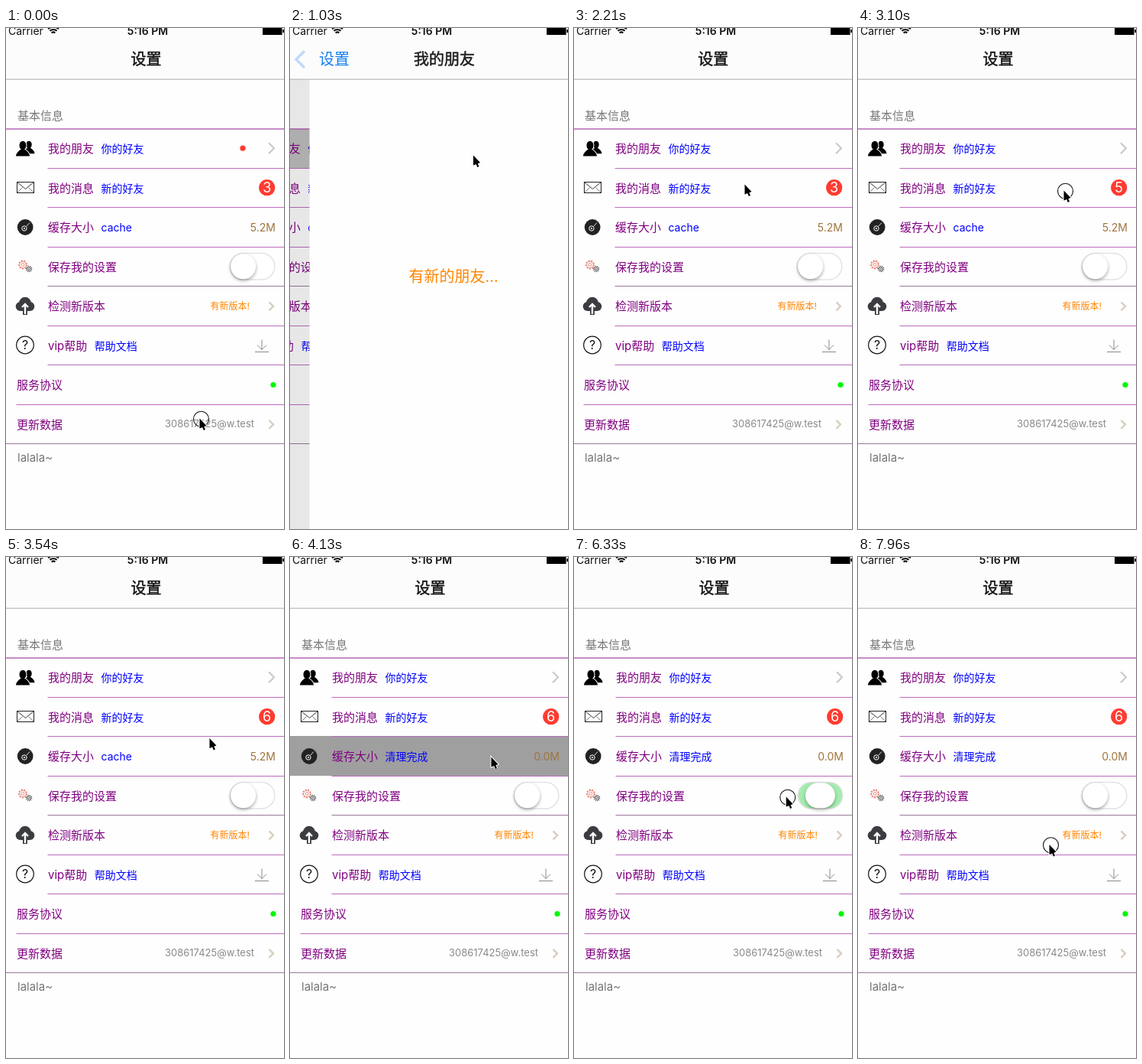
Write an HTML page with a canvas that moves like this. It is 364 by 655 pixels and loops after 8 s.

```html
<!DOCTYPE html>
<html lang="zh">
<head>
<meta charset="utf-8">
<style>
html, body { margin: 0; width: 100%; height: 100%; overflow: hidden; background: #fefefe; }
canvas { display: block; width: 364px; height: 655px; }
</style>
</head>
<body>
<canvas id="stage"></canvas>
<script>
const W = 364, H = 655, LOOP = 8000, STEP = 147.4;
const canvas = document.getElementById('stage');
const g = canvas.getContext('2d');
const scale = window.devicePixelRatio || 1;
canvas.width = W * scale;
canvas.height = H * scale;

const PURPLE = '#800080', BLUE = '#0000ff', RED = '#ff3b30', ORANGE = '#ff8500';
const GRAY = '#8a8a8a', INK = '#111', PAPER = '#fefefe', NAV_BLUE = '#127ff0';

const ROWS = [
  ['我的朋友', '你的好友'], ['我的消息', '新的好友'], ['缓存大小', 'cache'], ['保存我的设置'],
  ['检测新版本'], ['vip帮助', '帮助文档'], ['服务协议'], ['更新数据']
];
const ROW = 51.5;
const rowMid = i => 157.5 + ROW * i;
const rowEnd = i => Math.floor(183.25 + ROW * i);

const clamp = v => Math.max(0, Math.min(1, v));
const lerp = (a, b, p) => a + (b - a) * p;
const smooth = v => { v = clamp(v); return v * v * (3 - 2 * v); };

// Times of taps, counted in steps
const TAP = { friends: 5, back: 11, messages: [16, 18, 21], cache: 26, version: 54 };
const DRAG = { from: 37, to: 44 }, HOLD = { from: 47, to: 49 };
const CLICKS = [0, TAP.friends, TAP.back, ...TAP.messages, TAP.cache, TAP.version];

// Pointer stops: first step, last step, x, y
const MOVES = [
  [0, 3, 240, 167], [8, 11, 45, 41], [13, 15, 223.5, 205], [15, 16, 269.5, 213],
  [23, 25, 263.5, 262], [31, 34, 307.5, 313], [37, 40, 350, 315],
  [41, 45, 205.5, 313], [49, 54, 250.5, 376.5]
];

function pointerAt(n) {
  let at = [253.5, 511];
  for (const [from, to, x, y] of MOVES) {
    const p = smooth((n - from) / (to - from));
    at = [lerp(at[0], x, p), lerp(at[1], y, p)];
  }
  return at;
}

// Critically damped spring from 0 to 1
function spring(ms) {
  const x = Math.max(0, ms) * 0.0174;
  return 1 - (1 + x) * Math.exp(-x);
}

function text(s, x, y, size, color, align = 'left', weight = 400) {
  g.font = `${weight} ${size}px Inter, "Noto Sans CJK SC", "Noto Sans CJK", sans-serif`;
  g.textAlign = align;
  g.fillStyle = color;
  g.fillText(s, x, y);
}

function heading(s, x, color) {
  text(s, x, 48.2, 20, color, 'center');
  g.strokeStyle = color;
  g.lineWidth = 0.5;
  g.strokeText(s, x, 48.2);
}

function dot(x, y, r, color) {
  g.fillStyle = color;
  g.beginPath();
  g.arc(x, y, r, 0, 7);
  g.fill();
}

function ring(x, y, r, color, width = 1) {
  g.strokeStyle = color;
  g.lineWidth = width;
  g.beginPath();
  g.arc(x, y, r, 0, 7);
  g.stroke();
}

function line(points, color, width = 1) {
  g.beginPath();
  points.forEach(p => g.lineTo(...p));
  g.strokeStyle = color;
  g.lineWidth = width;
  g.stroke();
}

function chevron(x, y, size, color, width) {
  line([[x - size, y - Math.abs(size)], [x, y], [x - size, y + Math.abs(size)]], color, width);
}

// Vertical arrow; negative length points up
function arrow(x, y, length, head, color, width) {
  const tip = y + length, back = tip - Math.sign(length) * head;
  line([[x, y], [x, tip]], color, width);
  line([[x - head, back], [x, tip], [x + head, back]], color, width);
}

function pill(x, y, w, h) {
  g.beginPath();
  g.roundRect(x, y, w, h, h / 2);
}

function person(x, y, size) {
  g.beginPath();
  g.ellipse(x, y, size * 0.5, size * 0.65, 0, 0, 7);
  g.moveTo(x - size, y + size * 1.55);
  g.quadraticCurveTo(x - size, y + size, x, y + size * 0.4);
  g.quadraticCurveTo(x + size, y + size, x + size, y + size * 1.55);
  g.closePath();
  g.strokeStyle = PAPER;
  g.lineWidth = 2;
  g.stroke();
  g.fillStyle = '#000';
  g.fill();
}

function gear(x, y, r, color) {
  ring(x, y, r, color, 0.7);
  ring(x, y, r * 0.45, color, 0.7);
  g.setLineDash([r * 0.36, r * 0.5]);
  ring(x, y, r + 1, color, 1.4);
  g.setLineDash([]);
}

function icons() {
  person(30, 152.5, 7.5);
  person(22, 153.5, 9);

  g.strokeStyle = '#222';
  g.lineWidth = 1;
  g.strokeRect(14.5, 201.5, 22, 14);
  line([[14.5, 201.5], [25.5, 210.5], [36.5, 201.5]], '#222', 0.9);
  for (const side of [-1, 1]) {
    line([[25.5 + side * 11, 215.5], [25.5 + side * 4, 208.5]], '#222', 0.6);
  }

  dot(25.2, 260.5, 10.4, '#222');
  ring(24, 262, 3.2, '#fff');
  dot(24, 262, 1, '#fff');
  line([[27, 259], [31, 254.5]], '#ddd');

  gear(22, 309.5, 4.3, '#e0604e');
  gear(30, 315, 2.6, '#444');

  for (const i of [-1, 1, 0]) dot(25 + 6.3 * i, i ? 364 : 359.5, i ? 6 : 7.8, '#3b3c40');
  g.fillRect(19, 362, 12, 8);
  g.fillRect(22, 368, 6, 7);
  arrow(25, 374, -13, 4, '#fff', 2.4);

  ring(25, 414.5, 11.3, INK, 1.2);
  text('?', 25, 420.3, 16, INK, 'center');
}

function toggle(n) {
  const on = smooth((n - 39) / 2) - smooth((n - 42) / 2);
  const extra = n >= DRAG.from && n <= DRAG.to ? 6 : 0;
  pill(293.2, 294.5, 58.6, 34.5);
  g.fillStyle = '#fff';
  g.fill();
  g.globalAlpha = on;
  g.fillStyle = '#4cd964';
  g.fill();
  g.globalAlpha = 1;
  g.strokeStyle = on > 0.5 ? '#4cd964' : '#e3e3e3';
  g.lineWidth = 1.5;
  g.stroke();
  g.save();
  g.shadowColor = 'rgba(0,0,0,.35)';
  g.shadowBlur = 4 * scale;
  g.shadowOffsetY = 2 * scale;
  pill(lerp(294.2, 317.6 - extra, on), 295.3, 33 + extra, 33);
  g.fillStyle = '#fff';
  g.fill();
  g.restore();
}

// Full at the given step, held, then faded out
function highlight(i, n, from, hold, fade, color) {
  if (n < from) return;
  const y = i ? rowEnd(i - 1) : 132;
  g.globalAlpha = clamp(1 - (n - from - hold) / fade);
  g.fillStyle = color;
  g.fillRect(0, y, W + 120, rowEnd(i) - y);
  g.globalAlpha = 1;
}

function list(n) {
  const cleared = n > TAP.cache;
  highlight(0, n, TAP.friends, 7, 2.5, '#bfbfbf');
  TAP.messages.forEach(tap => highlight(1, n, tap + 1, 0.5, 1, '#a0a0a0'));
  highlight(2, n, TAP.cache + 1, 1.5, 1.4, '#9f9f9f');

  text('基本信息', 15, 120, 15, '#777');
  g.fillStyle = '#b35cb3';
  g.fillRect(0, 131.3, W + 120, 1.4);

  ROWS.forEach(([label, note], i) => {
    const x = i < 6 ? 55 : 14, y = rowMid(i) + 5.6;
    text(label, x, y, 15, PURPLE);
    const noteX = x + g.measureText(label).width + 9.5;
    if (note) text(i === 2 && cleared ? '清理完成' : note, noteX, y, 14, BLUE);
    g.fillStyle = i % 4 === 3 ? '#9a789a' : '#bd6cbd';
    g.fillRect(i < 7 ? x - 0.5 : 0, rowEnd(i), W + 120, 1);
  });
  icons();

  if (n < 7) dot(310, 157.2, 3.6, RED);
  chevron(351, 157.3, 7, '#c7c7cc', 2);
  const count = 3 + TAP.messages.filter(tap => n > tap).length;
  dot(341.7, 208.7, 10.6, RED);
  text(count, 341.7, 215.2, 18, '#fff', 'center');
  text(cleared ? '0.0M' : '5.2M', 353, 265.8, 14, '#a0743c', 'right');
  toggle(n);
  text('有新版本!', 319, 367.8, 12, ORANGE, 'right');
  arrow(335, 407.5, 13, 6, GRAY, 1);
  line([[326, 423.5], [344, 423.5]], GRAY);
  dot(350, 466.5, 3.6, '#00f800');
  text('308617425@w.test', 325, 522.3, 13, GRAY, 'right');
  for (const i of [4, 7]) chevron(350, rowMid(i) + 0.3, 5.5, '#d8cfbf', 2.4);
  text('lalala~', 15, 567, 15, '#777');
}

function statusBar() {
  text('Carrier', 3, 9, 14, INK);
  text('5:16 PM', 185.5, 9, 14, INK, 'center', 600);
  for (let i = 0; i < 3; i++) {
    g.beginPath();
    g.arc(62, 9, 3.5 + 3.4 * i, -2.3, -0.84);
    g.strokeStyle = INK;
    g.lineWidth = 2;
    g.stroke();
  }
  g.fillStyle = '#000';
  g.fillRect(336, 0, 25.5, 9);
  g.fillRect(362.3, 2, 1.7, 4);
}

function navBar(push) {
  g.fillStyle = '#fcfcfc';
  g.fillRect(0, 0, W, 67);
  g.fillStyle = '#b9b9b9';
  g.fillRect(0, 66.5, W, 1.2);
  statusBar();

  const x = lerp(183.5, 48.6, push);
  g.globalAlpha = clamp(1 - 2 * push);
  heading('设置', x, INK);
  g.globalAlpha = clamp(2 * push);
  text('设置', x, 48.2, 20, NAV_BLUE, 'center');
  g.globalAlpha = push;
  heading('我的朋友', 183.5 + 262 * (1 - push), INK);
  g.globalAlpha = Math.pow(push, 18);
  chevron(8, 41, -11, NAV_BLUE, 3.4);
  g.globalAlpha = 1;
}

function pointer(n) {
  const [x, y] = pointerAt(n);
  const held = [DRAG, HOLD].some(h => n >= h.from && n <= h.to);
  if (held || CLICKS.includes(n)) ring(x + 2, y + 0.3, 10, INK, 1.1);
  g.save();
  g.translate(x, y - 0.5);
  for (const [color, edge] of [['#fff', 2], ['#000', 0]]) {
    line([[3.5, 8], [6.4, 15]], color, 2.3 + edge);
    g.beginPath();
    g.moveTo(0, 0);
    g.lineTo(0, 13);
    g.lineTo(9, 9.4);
    g.closePath();
    g.fillStyle = color;
    g.fill();
    if (edge) {
      g.lineWidth = edge;
      g.stroke();
    }
  }
  g.restore();
}

function draw(n) {
  const t = n * STEP;
  const push = clamp(spring(t - 783) - spring(t - 1826));
  const pageX = W * (1 - push);
  g.setTransform(scale, 0, 0, scale, 0, 0);
  g.fillStyle = PAPER;
  g.fillRect(0, 0, W, H);

  g.save();
  g.translate(-109 * push, 0);
  list(n);
  g.restore();

  if (push > 0.02) {
    g.fillStyle = `rgba(0,0,0,${0.095 * push})`;
    g.fillRect(0, 0, W, H);
    g.fillStyle = PAPER;
    g.fillRect(pageX, 0, W, H);
    text('有新的朋友...', pageX + 130, 332, 20, ORANGE);
  }
  navBar(push);
  pointer(n);
}

// The picture advances in held steps
function frame(now) {
  draw(Math.floor((now % LOOP + 8) / STEP));
  requestAnimationFrame(frame);
}
requestAnimationFrame(frame);
</script>
</body>
</html>
```
